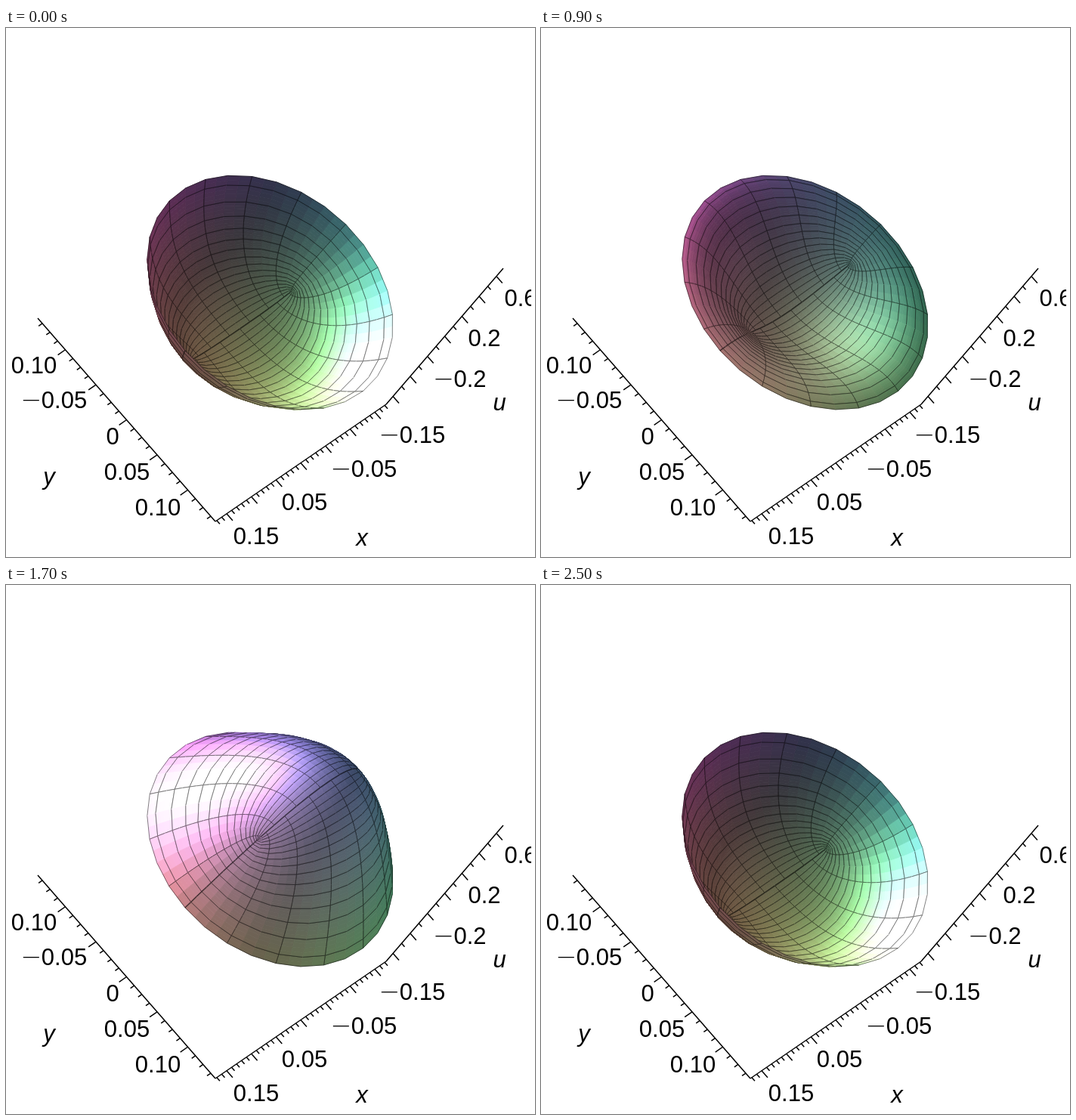
An HTML page with a canvas that plays this animation: 700x700 px, repeating every 2600 ms.

```html
<!DOCTYPE html>
<html lang="en">
<head>
<meta charset="utf-8">
<title>Vibrating elliptic membrane</title>
<style>
  html, body { margin: 0; width: 100%; height: 100%; overflow: hidden; background: #fff; }
  canvas { display: block; }
</style>
</head>
<body>
<canvas id="stage" width="700" height="700"></canvas>
<script>
const ctx = document.getElementById('stage').getContext('2d');
const N = 31, XI = 1.118, SUB = 2;
const LIGHT = [0.42, -0.84, 0.33];

// Orthographic projection of the unit box (every axis runs from -1 to 1)
const project = (x, y, u) => [
  349.5 - 112.5 * x + 117.5 * y + 78 * u,
  350 + 77 * x + 134.5 * y - 90.5 * u
];

// Vertex: screen x, y, colour r, g, b, depth
function vertex(i, j, [p, px, py]) {
  const eta = 2 * Math.PI * i / N, xi = XI * j / N;
  const x = Math.cosh(xi) / Math.cosh(XI) * Math.cos(eta);
  const y = Math.sinh(xi) / Math.sinh(XI) * Math.sin(eta);
  const q = 1 - x * x - y * y, w = p + px * x * x + py * y * y;
  const u = q * w;
  const ux = 2 * x * (px * q - w), uy = 2 * y * (py * q - w);
  const dot = (LIGHT[2] - LIGHT[0] * ux - LIGHT[1] * uy) / Math.hypot(ux, uy, 1);
  const d = Math.max(0, dot);
  const lum = 0.43 + 0.4 * d + 1.1 * d ** 4 + 0.12 * (d - dot);
  const gloss = 0.3 * d ** 6;
  const rgb = [x, y, u].map(v => Math.min(255, 255 * (lum * (0.675 + 0.325 * v) + gloss)));
  return [...project(x, y, u), ...rgb, 0.652 * x + 0.129 * y + 0.746 * u];
}

const mix = (a, b, t) => a.map((v, k) => v + (b[k] - v) * t);

function line(a, b, width) {
  ctx.lineWidth = width;
  ctx.beginPath();
  ctx.moveTo(a[0], a[1]);
  ctx.lineTo(b[0], b[1]);
  ctx.stroke();
}

function fillCell([a, b, c, d]) {
  const at = (s, t) => mix(mix(a, b, s), mix(d, c, s), t);
  ctx.lineWidth = 0.8;
  for (let m = 0; m < SUB; m++) for (let n = 0; n < SUB; n++) {
    const s = m / SUB, t = n / SUB, h = 1 / SUB;
    const mid = at(s + h / 2, t + h / 2);
    ctx.fillStyle = ctx.strokeStyle = `rgb(${mid.slice(2, 5).map(Math.round)})`;
    ctx.beginPath();
    for (const [e, f] of [[s, t], [s + h, t], [s + h, t + h], [s, t + h]]) {
      const v = at(e, f);
      ctx.lineTo(v[0], v[1]);
    }
    ctx.closePath();
    ctx.fill();
    ctx.stroke();
  }
}

function surface(phase) {
  const c = -Math.cos(phase), s = -Math.sin(phase);
  const shape = [0.557 * c + 0.83 * s, 0.5 * c - 0.15 * s, 0.3 * c - 0.35 * s];
  const grid = [];
  for (let i = 0; i <= N; i++) {
    grid.push([]);
    for (let j = 0; j <= N; j++) grid[i].push(vertex(i, j, shape));
  }
  const cells = [];
  for (let i = 0; i < N; i++) for (let j = 0; j < N; j++) {
    const v = [grid[i][j], grid[i + 1][j], grid[i + 1][j + 1], grid[i][j + 1]];
    cells.push({ i, j, v, depth: v.reduce((sum, p) => sum + p[5], 0) });
  }
  cells.sort((a, b) => a.depth - b.depth);
  const ruled = k => k % 2 === 0 || k === N;
  for (const { i, j, v } of cells) {
    fillCell(v);
    ctx.strokeStyle = 'rgba(0,0,0,0.55)';
    if (ruled(j)) line(v[0], v[1], j ? 0.9 : 1.4);
    if (ruled(j + 1)) line(v[3], v[2], 0.9);
    if (ruled(i)) line(v[0], v[3], i ? 0.9 : 1.4);
    if (ruled(i + 1)) line(v[1], v[2], i + 1 < N ? 0.9 : 1.4);
  }
}

// Axis from a to b over -range..range; every `major`-th step has a long tick
function axis(a, b, range, step, major, [dx, dy]) {
  line(a, b, 1.5);
  const last = Math.floor(range / step);
  for (let k = -last; k <= last; k++) {
    const p = mix(a, b, (k * step / range + 1) / 2);
    const len = k % major ? 6 : 12;
    line(p, [p[0] + dx * len, p[1] + dy * len], 1.5);
  }
}

// Number centred on its digits, with a long thin minus in front
function label(text, x, y, negative) {
  ctx.fillText(text, x, y + 11);
  if (negative) ctx.fillRect(x - ctx.measureText(text).width / 2 - 24, y, 21, 1.3);
}

function axes() {
  ctx.strokeStyle = ctx.fillStyle = '#000';
  axis([503, 498], [277, 653], 0.173, 0.01, 5, [0.66, 0.75]);
  axis([42, 384], [277, 653], 0.145, 0.0125, 4, [-0.82, 0.57]);
  axis([503, 498], [658, 318], 0.68, 0.1, 2, [0.66, 0.75]);

  ctx.textAlign = 'center';
  ctx.font = '31px "Liberation Sans", Arial, sans-serif';
  label('0.15', 331, 672);
  label('0.05', 395, 627);
  label('0.05', 487, 583, true);
  label('0.15', 551, 538, true);
  label('0.10', 37, 446);
  label('0.05', 77, 492, true);
  label('0', 141, 540);
  label('0.05', 160, 587);
  label('0.10', 201, 634);
  label('0.2', 614, 464, true);
  label('0.2', 633, 410);
  label('0.6', 681, 357);

  ctx.font = 'italic 31px "Liberation Sans", Arial, sans-serif';
  ctx.fillText('x', 471, 685);
  ctx.fillText('y', 57, 604);
  ctx.fillText('u', 653, 506);

  // The plot ends just short of the right edge
  ctx.fillStyle = '#fff';
  ctx.fillRect(695, 0, 5, 700);
}

let shown = -1;
function frame(now) {
  const step = Math.floor(now / 100) % 26;
  if (step !== shown) {
    shown = step;
    ctx.fillStyle = '#fff';
    ctx.fillRect(0, 0, 700, 700);
    ctx.lineJoin = 'round';
    axes();
    surface(2 * Math.PI * step / 25);
  }
  requestAnimationFrame(frame);
}
frame(performance.now());
</script>
</body>
</html>
```
